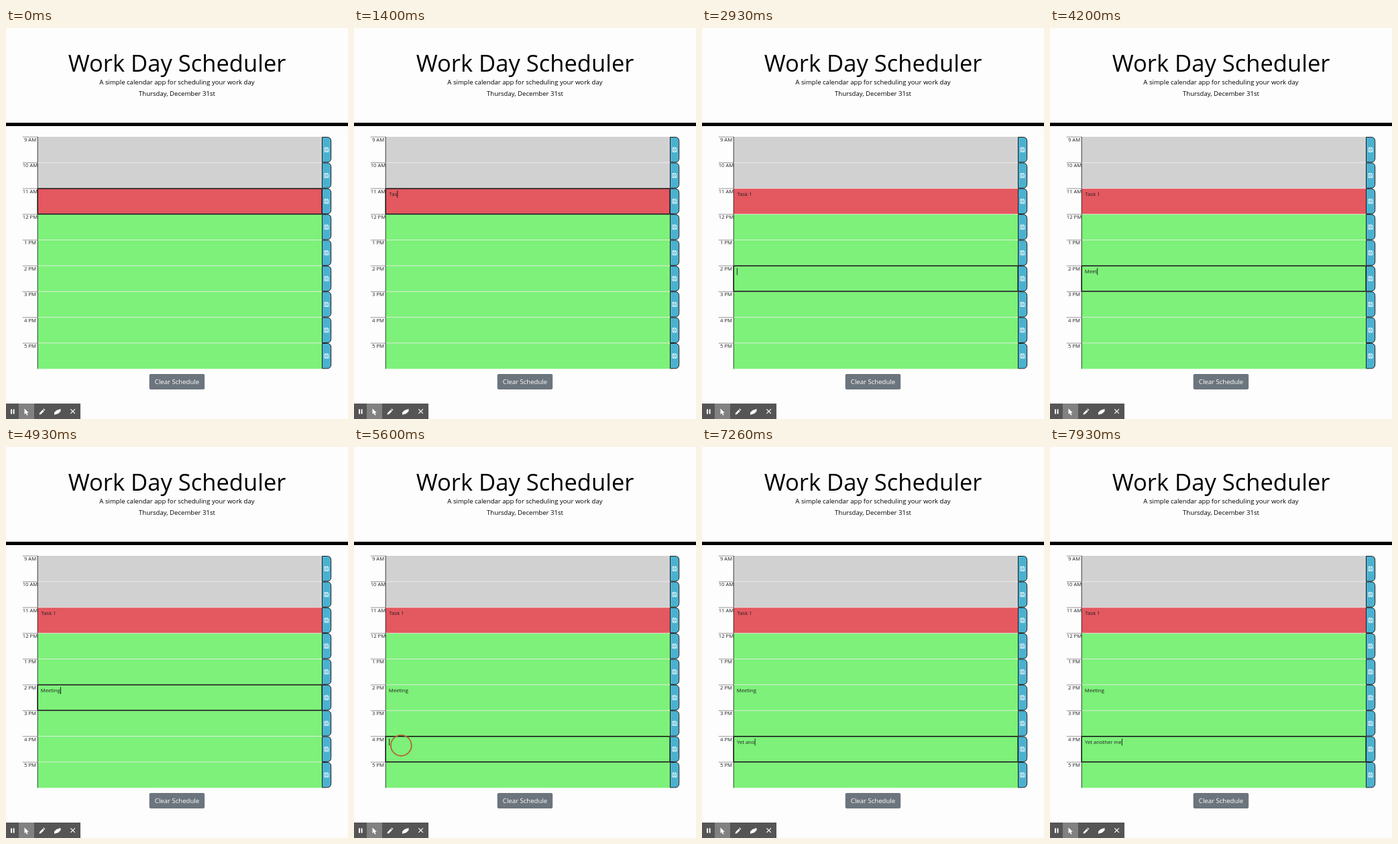
Write an HTML page that moves like this. It is 510 px wide and 582 px high and loops after 8 s.

```html
<!DOCTYPE html>
<html lang="en">
<head>
<meta charset="utf-8">
<title>Work Day Scheduler</title>
<style>
  html, body { margin: 0; width: 100%; height: 100%; overflow: hidden; background: #fdfdfd; }
  svg { display: block; width: 510px; height: 582px; font: 7.68px "Open Sans", "Noto Sans", sans-serif; }
  .lead { font-size: 9.6px; }
  .mid { text-anchor: middle; }
  .entry { white-space: pre; fill: #222; }
</style>
</head>
<body>
<svg viewBox="0 0 510 582">
  <defs>
    <g id="save" fill="none" stroke="#fff" stroke-width=".9">
      <path d="M-3-3.1H2L3.1-2V3.1H-3Z"/>
      <path d="M-1.6-3v2.1H1.5V-3M-1.4 3V1H1.4V3" stroke-width=".8"/>
    </g>
  </defs>
  <g class="mid">
    <text x="255" y="65" font-size="34.56">Work Day Scheduler</text>
    <text class="lead" x="255" y="84">A simple calendar app for scheduling your work day</text>
    <text class="lead" x="255" y="101.3">Thursday, December 31st</text>
  </g>
  <rect y="141" width="510" height="5"/>
  <g id="rows"></g>
  <rect id="focus" x="47.2" width="424" height="38" rx="1" fill="none" stroke="#111" stroke-width="1.4"/>
  <g id="entries"></g>
  <path id="caret" stroke="#000" stroke-width=".8"/>
  <circle id="ring" fill="none" stroke="#b46a34" stroke-width="1.9"/>
  <rect x="213.7" y="515" width="82.5" height="23" rx="2.3" fill="#6c757d"/>
  <text class="lead mid" x="255" y="529.5" fill="#fff">Clear Schedule</text>

  <rect y="559" width="111" height="23" fill="#555"/>
  <rect x="19" y="559" width="23" height="23" fill="#818181"/>
  <g fill="#fff">
    <path d="M7 567.5h2v7H7zM10.6 567.5h2v7h-2z"/>
    <path d="M27.5 566.5v8.6l2-1.8 1.5 3.3 1.6-.7-1.5-3.2h2.7z"/>
    <path d="M49.5 575.5l.6-2.6 4.7-4.7 2 2-4.7 4.7zM55.4 567.6l1-1 2 2-1 1z"/>
    <path d="M72 572.2l3.5-3.2 6-2v3.4l-3.6 3.6-5.9 1.8z"/>
    <path d="M96.3 567.3l6.6 6.6m0-6.6l-6.6 6.6" stroke="#fff" stroke-width="1.2"/>
  </g>
</svg>
<script>
const LOOP = 8000, TOP = 162, PITCH = 38.37, BLINK = 530;
const hours = ["9 AM", "10 AM", "11 AM", "12 PM", "1 PM", "2 PM", "3 PM", "4 PM", "5 PM"];
const tasks = [
  { row: 2, x: 52.6, text: "Task 1", focus: -550, start: 1180, step: 105 },
  { row: 5, x: 51.8, text: "Meeting", focus: 2670, start: 3930, step: 85, click: [68, 367] },
  { row: 7, x: 52, text: "Yet another me", focus: 5560, start: 6660, step: 93, click: [70.3, 444.3] }
];
const $ = id => document.getElementById(id);
const rowTop = i => TOP + i * PITCH;

function add(parent, tag, attrs, text = "") {
  const node = document.createElementNS("http://www.w3.org/2000/svg", tag);
  for (const key in attrs) node.setAttribute(key, attrs[key]);
  node.textContent = text;
  return parent.appendChild(node);
}

function set(node, attrs) {
  for (const key in attrs) node.setAttribute(key, attrs[key]);
}

hours.forEach((hour, i) => {
  const y = rowTop(i), rows = $("rows");
  const fill = i < 2 ? "#d1d1d1" : i === 2 ? "#e45860" : "#7df17a";
  add(rows, "rect", { x: 47, y, width: 424.5, height: PITCH, fill });
  if (i) add(rows, "path", { d: `M47 ${y}H471`, stroke: "#eee", "stroke-width": .8 });
  add(rows, "path", { d: `M25 ${y + .2}H47`, stroke: "#222", "stroke-width": .7, "stroke-dasharray": "1.4 .7" });
  add(rows, "path", { d: `M47.2 ${y}v${PITCH}`, stroke: "#111", "stroke-width": .8 });
  add(rows, "text", { x: 36, y: y + 7, class: "mid", fill: "#222" }, hour);
  add(rows, "path", {
    d: `M471.5 ${y + .5}h7.2q6 0 6 6v${PITCH - 13}q0 6-6 6h-7.2z`,
    fill: "#4bb1d0", stroke: "#1c1c1c", "stroke-width": 1
  });
  add(rows, "use", { href: "#save", x: 478, y: y + 19.2 });
});

for (const task of tasks) {
  task.node = add($("entries"), "text", { x: task.x, y: rowTop(task.row) + 11.5, class: "entry" });
}

function typedCount(task, t) {
  const count = Math.floor((t - task.start) / task.step) + 1;
  return Math.max(0, Math.min(task.text.length, count));
}

function draw(t) {
  for (const task of tasks) {
    const typed = task.text.slice(0, typedCount(task, t));
    if (task.node.textContent !== typed) task.node.textContent = typed;
  }

  const active = tasks.filter(task => t >= task.focus).pop();
  const y = rowTop(active.row), count = typedCount(active, t);
  set($("focus"), { y: y + .2 });

  // Each keystroke restarts the blink.
  const since = count ? t - active.start - (count - 1) * active.step : t - active.focus;
  const caretX = active.x + .6 + (count ? active.node.getComputedTextLength() : 0);
  set($("caret"), {
    d: `M${caretX} ${y + 3.4}v10.4`,
    opacity: Math.floor(since / BLINK) % 2 ? 0 : 1
  });

  const age = t - active.focus;
  const shown = active.click && age < 230;
  set($("ring"), { opacity: shown ? Math.min(1, (230 - age) / 120) : 0 });
  if (shown) set($("ring"), { cx: active.click[0], cy: active.click[1], r: 15.4 });
}

function frame() {
  draw(performance.now() % LOOP);
  requestAnimationFrame(frame);
}
frame();
</script>
</body>
</html>
```
